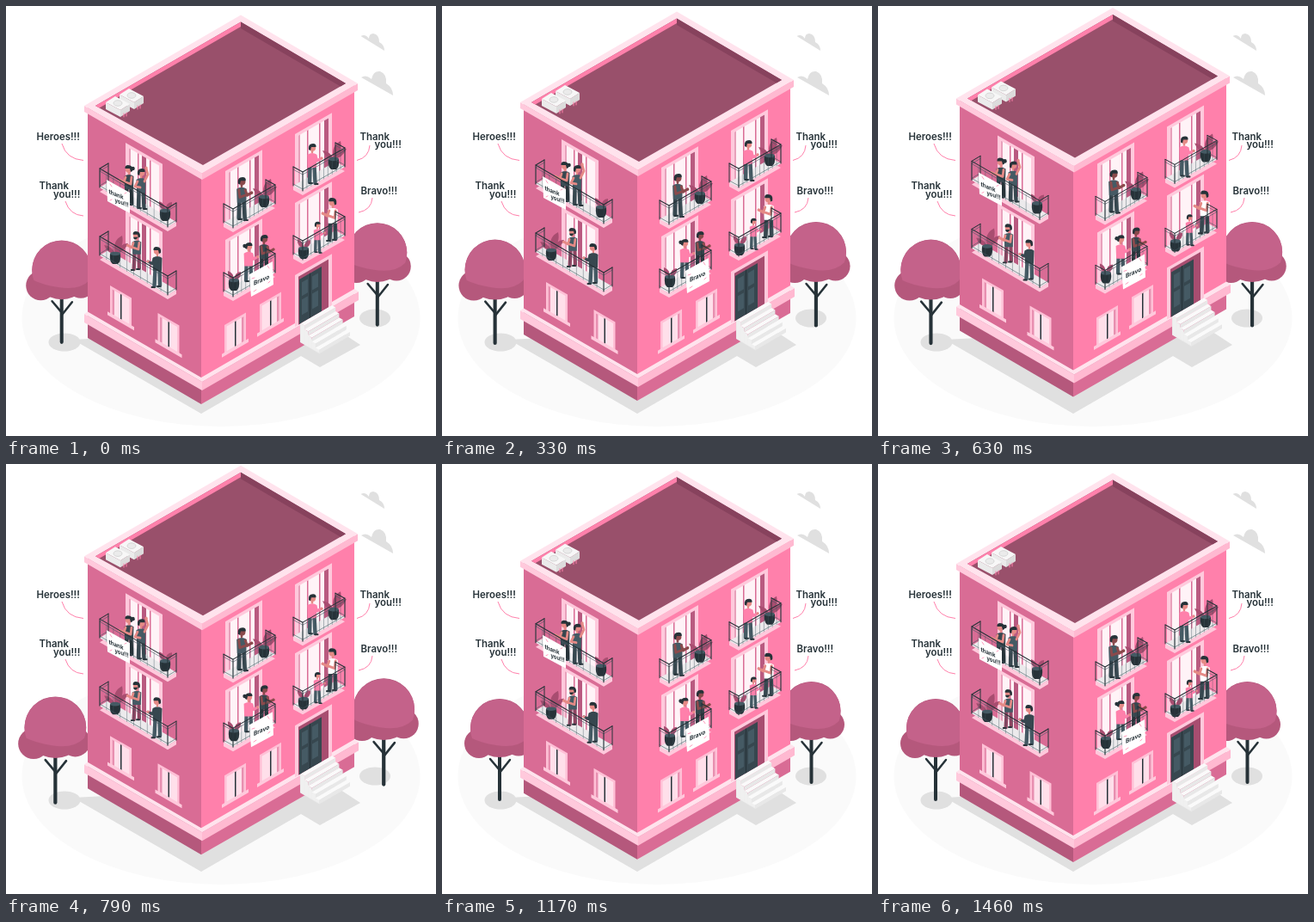
An HTML page that plays this animation: 500x500 px, repeating every 1.5 s.

```html
<!DOCTYPE html>
<html lang="en">
<head>
<meta charset="utf-8">
<style>
  html, body { margin: 0; height: 100%; overflow: hidden; background: #fff; }
  svg { display: block; width: 100vw; height: 100vh; }
  text { font: 600 11.400px Inter, sans-serif; fill: #263238; }
  .sign text { font-size: 7.200px; font-weight: 700; }
</style>
</head>
<body>
<svg viewBox="0 0 500 500">
  <ellipse cx="250" cy="363" rx="231.500" ry="126" fill="#fafafa"/>
  <g fill="#e0e0e0">
    <path d="M78 388 227 474 343 407 365 420 412 394 380 373 227 380Z"/>
    <ellipse cx="68" cy="391" rx="18.500" ry="10.500"/>
    <ellipse cx="429" cy="363" rx="18" ry="10.500"/>
    <path d="M412.500 35Q418 32 422 38Q422 32 427 32Q434 33 434 42Q440 45 440 52Z"/>
    <path d="M413 83Q419 79 425 85Q427 75 435 76Q443 79 442 90Q450 95 450 104Z"/>
  </g>
  <g id="trees"></g>
  <g id="house"></g>
  <g>
    <text x="35.500" y="155.500">Heroes!!!</text>
    <text x="38.500" y="213">Thank</text><text x="55" y="222.500">you!!!</text>
    <text x="411.500" y="155.500">Thank</text><text x="428.500" y="165">you!!!</text>
    <text x="412.500" y="219">Bravo!!!</text>
  </g>
  <path d="M65 160Q70 178 90 179.500M69 227Q74 243 90 244M423 162Q422 176 408 179.500M426 223Q425 237 410 240" fill="none" stroke="#ff80ab"/>
</svg>
<script>
const INK = '#263238', SLATE = '#455a64', PINK = '#ff80ab', ROSE = '#d96c95',
      PLUM = '#a84d70', BERRY = '#b5587c', PALE = '#ffc9dc', LIGHT = '#ffe3ed',
      SKIN = '#e58a86', BROWN = '#8a4a4c';
const LOOP = 1500, PHASE = 20, SLOPE = 0.577;
const $ = id => document.getElementById(id);

const poly = (points, fill) => `<polygon points="${points}" fill="${fill}"/>`;
const rect = (x, y, w, h, fill) => `<rect x="${x}" y="${y}" width="${w}" height="${h}" fill="${fill}"/>`;
const circle = (x, y, r, fill) => `<circle cx="${x}" cy="${y}" r="${r}" fill="${fill}"/>`;
const line = (d, stroke, width = 1) =>
  `<path d="${d}" fill="none" stroke="${stroke}" stroke-width="${width}" stroke-linecap="round" stroke-linejoin="round"/>`;
// side: 1 for the left wall, -1 for the right wall
const onWall = (side, x, y, body) => `<g transform="matrix(1 ${side * SLOPE} 0 1 ${x} ${y})">${body}</g>`;
const shift = (points, dx, dy) => points.map(([x, y]) => [x + dx, y + dy]);

function tree(x, y, side) {
  return `<g transform="translate(${x} ${y})">`
    + line('M0 30V83', INK, 4) + line('M0 49-11 36M0 52 12 37', INK, 2.500)
    + circle(-24, 18, 17, BERRY) + circle(22, 16, 16.500, BERRY)
    + circle(0, 0, 34, BERRY)
    + `<path d="M-32 12A34 34 0 1 1 32 12Q20 24 -4 20Q-22 17 -32 12Z" fill="#c4628a"/></g>`;
}

function glassDoor(side, x, y) {
  const gap = side > 0 ? 19 : 34;
  return onWall(side, x, y, rect(0, 0, 43, 66, PALE) + rect(4, 4, 35, 62, '#fff3f7')
    + rect(gap, 4, 5, 62, '#b95a80') + rect(14, 4, 1.500, 62, ROSE) + rect(28, 4, 1.500, 62, ROSE)
    + rect(4, 4, 2, 62, '#e8a0bb'));
}

function smallWindow(side, x, y) {
  return onWall(side, x, y, rect(0, 0, 25, 33, '#ffc0d6') + rect(2.500, 3, 20, 29, '#ffdfea')
    + rect(side > 0 ? 2.500 : 20, 3, 2.500, 29, '#e88fb0') + rect(12, 3, 1.500, 29, INK)
    + rect(-3, 32, 31, 4, PALE));
}

const slab = p => poly([...p, ...shift(p, 0, 5).reverse()], PALE) + poly(p, '#eceaec');

function rails(p) {
  const path = dy => 'M' + shift(p, 0, dy).join(' ');
  const [, a, b] = p;
  let bars = '';
  for (let i = 0; i <= 10; i++) {
    const k = i / 10, y = a[1] + (b[1] - a[1]) * k;
    bars += `M${a[0] + (b[0] - a[0]) * k} ${y}v-20`;
  }
  return line(path(-22), INK, 1.100) + line(path(-19), SLATE, .6) + line(path(-2), SLATE, .6)
    + line(bars, SLATE, .4) + line(p.map(([x, y]) => `M${x} ${y}v-22`).join(''), INK);
}

// (x, y) is the point between the feet; dir is the facing side
function person(x, y, { h = 48, dir = 1, skin = SKIN, top = PINK, sleeve = top, legs = INK, bun, beard, wave }) {
  const arms = wave ? 'M4-32 8-40 6-47M-4-32-7-26-1-25' : 'M-3-33-2-25 9-29M4-33 6-27 11-30';
  return `<g transform="translate(${x} ${y}) scale(${dir * h / 48} ${h / 48})">`
    + line('M-2.500-21-3-2M2.500-21 3.500-1', legs, 4.400) + line('M-3-1h3M3.500 0h3', INK, 2)
    + `<path d="M-5.500-34Q0-38 5.500-34L5-19H-5Z" fill="${top}"/>`
    + line(arms, sleeve, 2.800)
    + circle(wave ? 6 : 11, wave ? -48 : -30, 1.600, skin)
    + line('M0-37V-40', skin, 2.500) + circle(.5, -42, 3.700, skin)
    + `<path d="M-4-40Q-5-47 1-47Q5-47 4.500-43L-1-43L-2-39Z" fill="${INK}"/>`
    + (bun ? circle(-4.500, -43, 2.300, INK) : '')
    + (beard ? `<path d="M-2-40 4-40Q4-37 1-37Z" fill="${INK}"/>` : '') + '</g>';
}

function plant(x, y, tall) {
  const leaves = tall ? 'M0 0Q-4-15 8-21Q11-8 0 0Q7-13 15-12Q10-1 0 0Q-4-9-13-10Q-9 0 0 0'
                      : 'M0 0Q-8-3-7-11Q0-9 0 0Q1-10 8-10Q9-2 0 0';
  return `<g transform="translate(${x} ${y})"><path d="${leaves}Z" fill="${PLUM}"/>`
    + `<path d="M-6 0H6Q7 9 3 12H-3Q-7 9-6 0Z" fill="${INK}"/><ellipse rx="6" ry="2.300" fill="${SLATE}"/></g>`;
}

function airUnit(x, y) {
  return `<g transform="translate(${x} ${y})">`
    + poly('-14,0 3,9 3,17 -14,8', '#ebebeb') + poly('3,9 14,2 14,10 3,17', '#dcdcdc')
    + poly('-14,0 -3,-7 14,2 3,9', '#f7f7f7')
    + `<ellipse cy="1" rx="5" ry="3.300" fill="#ebebeb" stroke="#ccc" stroke-width=".7"/>`
    + line('M7 13v4M10 12v4', PINK) + '</g>';
}

function stairs() {
  let out = poly('342,369 342,391 364,404 364,399', '#ebebeb');
  for (let i = 0; i < 5; i++) {
    const x = 343 + i * 4.200, y = 369 + i * 7.100, front = x + 4.200;
    out += poly([[x, y], [x + 36, y - 21], [front + 36, y - 18.500], [front, y + 2.500]], '#fafafa')
      + poly([[front, y + 2.500], [front + 36, y - 18.500], [front + 36, y - 13.800], [front, y + 7.200]], '#e8e8e8')
      + poly([[x, y], [front, y + 2.500], [front, 393.500 + i * 2.400], [x, 391 + i * 2.400]], '#f0f0f0');
  }
  return out;
}

function shell() {
  return poly('95,360 227,436 227,463 95,386', BERRY) + poly('227,436 405,334 405,361 227,463', ROSE)
    + poly('95,118 227,194 227,437 95,361', ROSE) + poly('227,194 405,92 405,335 227,437', PINK)
    + poly('91,358 228,437 228,447 91,368', PALE) + poly('228,437 410,332 410,342 228,447', '#ffb9d1')
    + poly('91,358 95,355.500 227,432 405,329 410,332 228,437', LIGHT)
    + poly('91,116 228,194.500 228,202 91,123', PALE) + poly('228,194.500 409,90 409,98 228,202', '#ffb9d1')
    + poly('91,116 273,10.500 409,90 228,194.500', LIGHT)
    + poly('104,116 273,18.500 395,90 229,185', '#99506b')
    + poly('104,116 273,18.500 273,24 108.500,118.500', PINK) + poly('273,18.500 395,90 389,93.500 273,26', '#87425d');
}

function frontDoor() {
  return onWall(-1, 336, 313, rect(0, 0, 43, 60, PALE) + rect(4, 4, 35, 56, PLUM)
    + rect(5, 8, 26, 52, '#37474f') + rect(17, 8, 1, 52, INK)
    + [8, 20].map(x => rect(x, 13, 7, 16, SLATE) + rect(x, 33, 7, 18, SLATE)).join(''));
}

const LEFT = [[119, 205], [109, 211], [188, 257], [198, 251]];
const RIGHT = [[253, 252], [264, 258], [313, 230], [302, 224]];

function balcony(side, dx, dy, inside) {
  const p = shift(side > 0 ? LEFT : RIGHT, dx, dy);
  const [x, y] = side > 0 ? [139, 159] : [255, 192];
  return glassDoor(side, x + dx, y + dy) + slab(p) + inside + rails(p);
}

const signs = `<g class="sign">`
  + poly('117,202 144,217 144,241 118,227', '#fff') + poly('283,312 310,297 311,324 285,338', '#fff')
  + `<text transform="matrix(.85 .35 0 1 119.500 218)">thank</text>`
  + `<text transform="matrix(.8 .3 0 1 126.500 228)">you!!!</text>`
  + `<text transform="matrix(.9 -.4 0 1 288 325)">Bravo</text>`
  + line('M121 207l2 3M138 218l2-1M121 226l2-1M286 317l3-1M304 302l2 3M288 332l3-2M305 322l2-2', PINK, .8) + '</g>';

$('trees').innerHTML = tree(67, 307) + tree(429.500, 287);
$('house').innerHTML = shell() + airUnit(146, 103) + airUnit(130, 112)
  + smallWindow(1, 121, 325) + smallWindow(1, 176.500, 357)
  + smallWindow(-1, 254, 371) + smallWindow(-1, 295, 347)
  + frontDoor() + stairs()
  + balcony(1, 0, 79,
      plant(127, 288, true)
      + person(152, 307, { h: 46, top: SLATE, sleeve: SKIN, legs: '#8f4562', dir: -1, beard: true })
      + person(176, 327, { dir: -1, top: '#37474f', legs: SLATE }))
  + balcony(1, 0, 0,
      person(143, 232, { dir: -1, top: '#37474f', sleeve: SKIN, bun: true })
      + person(157, 236, { top: SLATE, sleeve: SKIN, legs: '#37474f', wave: true })
      + plant(185, 238))
  + balcony(-1, 81, 37,
      plant(346, 282)
      + person(362, 287, { h: 37, top: PINK, legs: SLATE })
      + person(380, 273, { h: 51, dir: -1, top: '#fff', sleeve: SKIN, legs: '#37474f' }))
  + balcony(-1, 81, -43,
      person(356, 207, { top: PINK, legs: SLATE }) + plant(381, 178, true))
  + balcony(-1, 0, 80,
      plant(265, 319)
      + person(282, 321, { h: 47, top: PINK, legs: SLATE, bun: true })
      + person(300, 313, { h: 48, skin: BROWN, top: '#37474f', sleeve: BROWN }))
  + balcony(-1, 0, 0,
      person(274, 249, { h: 51, skin: BROWN, top: SLATE, sleeve: BROWN, legs: '#37474f' })
      + plant(300, 222, true))
  + signs;

// Two beats per loop: [start, peak, end] in ms
const BEATS = [[0, 150, 450], [600, 750, 900]];

function treeScale(t) {
  const beat = BEATS.find(([start, , end]) => t >= start && t < end);
  if (!beat) return 1;
  const [start, peak, end] = beat;
  return 1 + .09 * (t < peak ? (t - start) / (peak - start) : (end - t) / (end - peak));
}

function draw(now) {
  const t = (now + PHASE) % LOOP;
  const lift = 4.5 * (1 - Math.cos(t / LOOP * 2 * Math.PI));
  $('house').setAttribute('transform', `translate(0 ${-lift})`);
  $('trees').setAttribute('transform', `translate(247.500 322) scale(${treeScale(t)}) translate(-247.500 -322)`);
  requestAnimationFrame(draw);
}
draw(0);
</script>
</body>
</html>
```
